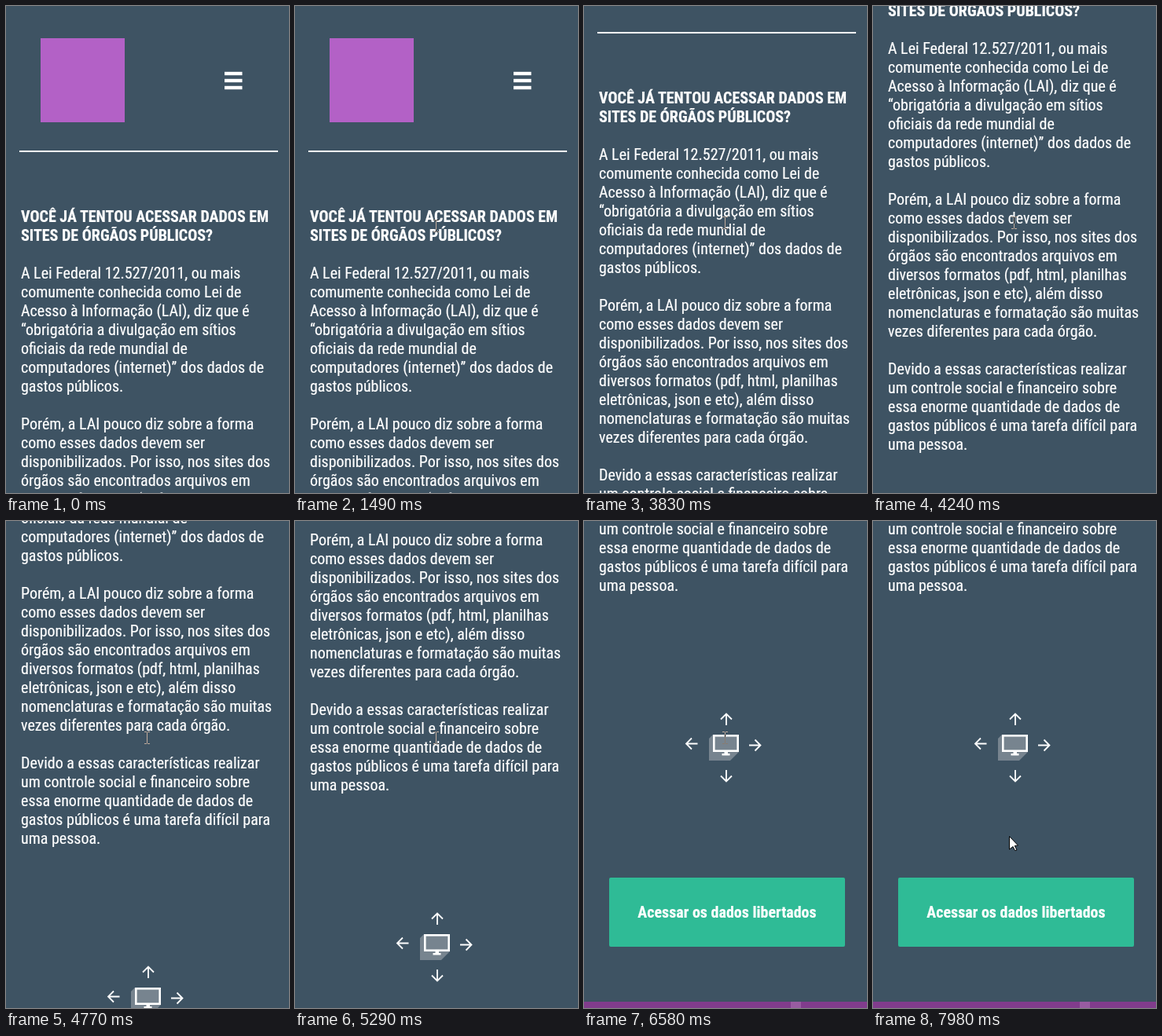
These frames come from a looping animation (360x620 px, 8 s). An HTML page with a canvas:

```html
<!DOCTYPE html>
<html lang="pt-BR">
<head>
<meta charset="utf-8">
<title>Dados públicos</title>
<style>
html, body { margin: 0; width: 100%; height: 100%; overflow: hidden; background: #3e5363; }
#stage { position: relative; width: 360px; height: 620px; overflow: hidden; background: #3e5363; isolation: isolate; }
#page { position: absolute; left: 0; top: 0; width: 360px; height: 1400px; }
canvas { position: absolute; left: 0; top: 0; }
#page p {
  position: absolute; left: 19px; margin: 0; white-space: pre-line; color: #fff;
  font: 20px/24px "Roboto Condensed", Roboto, sans-serif; font-stretch: 75%;
  -webkit-text-stroke: 0.2px #fff;
}
#page .bold { font-weight: 700; }
#head { top: 256px; }
#body { top: 328px; }
#page #label { top: 1248px; left: 32px; width: 300px; text-align: center; }
#page p { width: max-content; }
</style>
</head>
<body>
<div id="stage">
  <div id="page">
    <canvas id="art" width="360" height="1400"></canvas>
    <p id="head" class="bold">VOCÊ JÁ TENTOU ACESSAR DADOS EM
SITES DE ÓRGÃOS PÚBLICOS?</p>
    <p id="body">A Lei Federal 12.527/2011, ou mais
comumente conhecida como Lei de
Acesso à Informação (LAI), diz que é
“obrigatória a divulgação em sítios
oficiais da rede mundial de
computadores (internet)” dos dados de
gastos públicos.

Porém, a LAI pouco diz sobre a forma
como esses dados devem ser
disponibilizados. Por isso, nos sites dos
órgãos são encontrados arquivos em
diversos formatos (pdf, html, planilhas
eletrônicas, json e etc), além disso
nomenclaturas e formatação são muitas
vezes diferentes para cada órgão.

Devido a essas características realizar
um controle social e financeiro sobre
essa enorme quantidade de dados de
gastos públicos é uma tarefa difícil para
uma pessoa.</p>
    <p id="label" class="bold">Acessar os dados libertados</p>
  </div>
  <canvas id="cursor" width="360" height="620"></canvas>
</div>
<script>
const LOOP = 8000, STEP = 67, PHASE = 57;
const TICK = 95.25;          // pixels per wheel notch
const ENTER = 258, LEAVE_TEXT = 6950;

const page = document.getElementById('page');
const cursor = document.getElementById('cursor');
const g = document.getElementById('art').getContext('2d');
const c = cursor.getContext('2d');

function rect(color, x, y, w, h) {
  g.fillStyle = color;
  g.fillRect(x, y, w, h);
}

function arrow(x, y, angle) {
  g.save();
  g.translate(x, y);
  g.rotate(angle);
  g.strokeStyle = '#fff';
  g.lineWidth = 1.8;
  g.beginPath();
  g.moveTo(-7.5, 0);
  g.lineTo(6.5, 0);
  g.moveTo(0, -7);
  g.lineTo(7, 0);
  g.lineTo(0, 7);
  g.stroke();
  g.restore();
}

function monitor(x, y) {
  g.save();
  g.translate(x, y);
  g.fillStyle = '#77848f';
  g.beginPath();
  g.moveTo(5, 0);
  g.lineTo(38, 0);
  g.lineTo(38, 22);
  g.lineTo(27, 33);
  g.lineTo(0, 33);
  g.lineTo(0, 5);
  g.fill();
  g.strokeStyle = '#fff';
  g.lineWidth = 2.6;
  g.strokeRect(6.3, 1.3, 30.4, 19.4);
  rect('#fff', 19.5, 22, 4.5, 3);
  rect('#fff', 16.5, 24, 10, 2.5);
  g.restore();
}

function drawPage() {
  rect('#b361c6', 44, 41, 107, 107);
  for (let i = 0; i < 3; i++) rect('#fff', 278, 83.8 + 9 * i, 22.5, 4.4);
  rect('#fff', 17, 184, 329, 2);

  arrow(181, 1014.5, -Math.PI / 2);
  arrow(181, 1086.5, Math.PI / 2);
  arrow(137, 1045.5, Math.PI);
  arrow(217.5, 1047.5, 0);
  monitor(159, 1034);

  g.fillStyle = '#2fbb96';
  g.beginPath();
  g.roundRect(32, 1216, 300, 88, 2);
  g.fill();
  rect('#813c8c', 0, 1374, 360, 26);
  rect('#985ca1', 263, 1374, 13, 26);
}

// Eased progress from 0 to 1
function ease(t, start, dur) {
  const u = Math.min(1, Math.max(0, (t - start) / dur));
  return u * (2 - u);
}

const wheel = [
  { at: 3199, dur: 225, notches: 1 },
  { at: 3742, dur: 421, notches: 2 },
  { at: 4600, dur: 260, notches: 2 },
  { at: 5238, dur: 246, notches: 1 },
  { at: 5645, dur: 170, notches: 1 },
  { at: 6330, dur: 225, notches: 1 }
];
const scrollAt = t =>
  TICK * wheel.reduce((sum, w) => sum + w.notches * ease(t, w.at, w.dur), 0);

// Each move starts where the one before it ended
const moves = [
  { at: ENTER, dur: 600, x: 179, y: 339 },
  { at: 1001, dur: 455, x: 179, y: 280 },
  { at: 2700, dur: 30, x: 179, y: 276 },
  { at: 6892, dur: 465, x: 169, y: 350 },
  { at: 7770, dur: 190, x: 173, y: 401 }
];
function pointerAt(t) {
  let x = 341, y = 614;
  for (const m of moves) {
    const u = ease(t, m.at, m.dur);
    x += (m.x - x) * u;
    y += (m.y - y) * u;
  }
  return [Math.round(x), Math.round(y)];
}

function drawBeam(x, y) {
  c.fillStyle = '#fff';
  for (const dy of [-8, 7]) {
    c.fillRect(x - 3, y + dy, 3, 1);
    c.fillRect(x + 1, y + dy, 3, 1);
  }
  c.fillRect(x, y - 7, 1, 14);
}

function drawArrow(x, y) {
  c.save();
  c.translate(x + 0.5, y + 0.5);
  c.beginPath();
  c.moveTo(0, 0);
  c.lineTo(11, 11.5);
  c.lineTo(6.8, 12);
  c.lineTo(9.5, 17.5);
  c.lineTo(7, 18);
  c.lineTo(4.6, 13);
  c.lineTo(0, 16.5);
  c.closePath();
  c.fillStyle = '#fff';
  c.fill();
  c.strokeStyle = '#000';
  c.stroke();
  c.restore();
}

function render(now) {
  const t = Math.floor((now % LOOP - PHASE) / STEP) * STEP + PHASE;
  page.style.transform = `translateY(${-Math.round(scrollAt(t))}px)`;
  c.clearRect(0, 0, 360, 620);
  if (t < ENTER) return;
  const beam = t < LEAVE_TEXT;
  // The text pointer inverts what lies under it
  cursor.style.mixBlendMode = beam ? 'difference' : 'normal';
  (beam ? drawBeam : drawArrow)(...pointerAt(t));
}

drawPage();
const t0 = performance.now();
function frame() {
  render(performance.now() - t0);
  requestAnimationFrame(frame);
}
frame();
</script>
</body>
</html>
```
